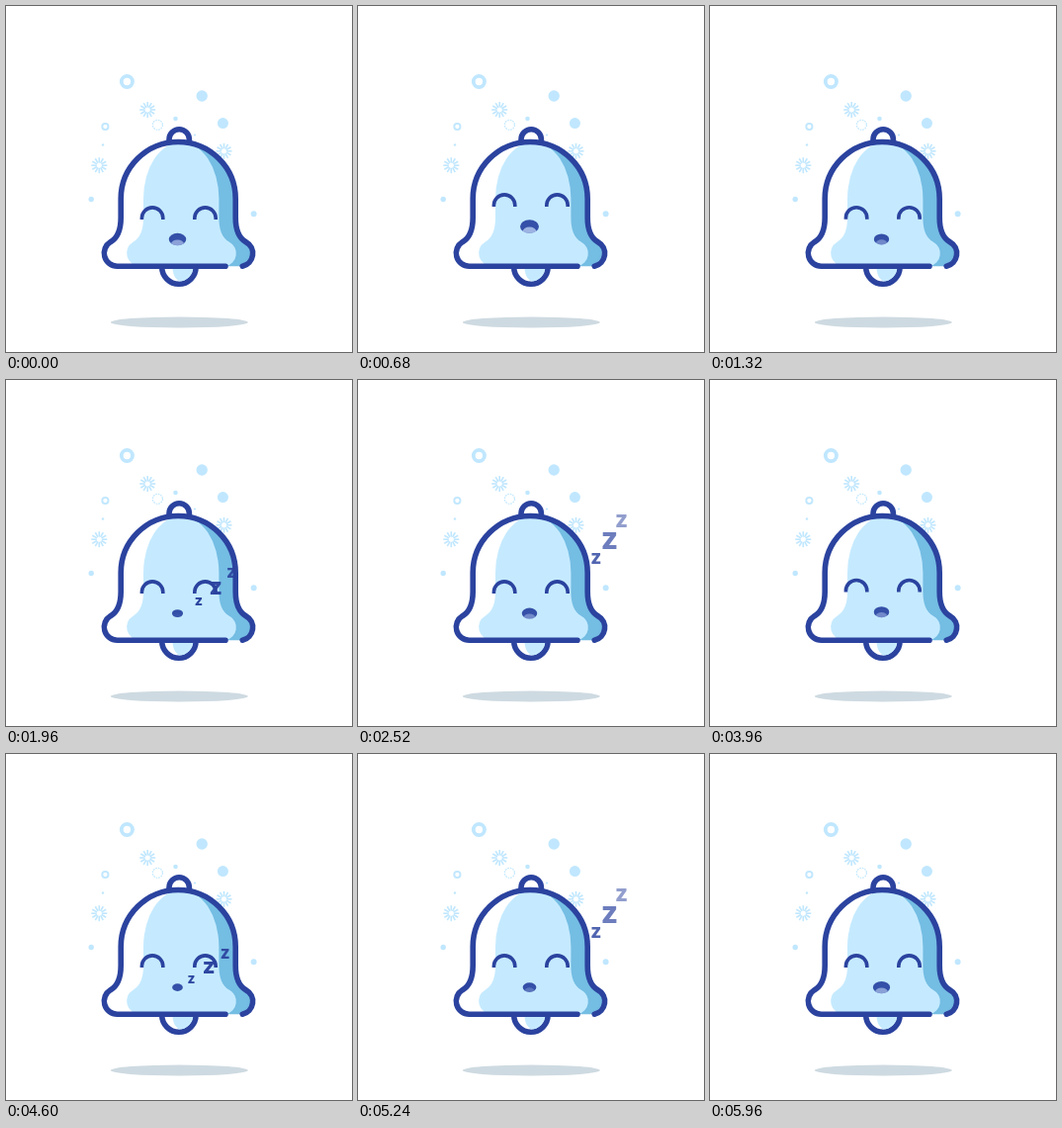
An HTML page for the animation above (6 s loop, 350 by 350 pixels).

```html
<!DOCTYPE html>
<html lang="en">
<head>
<meta charset="utf-8">
<title>Sleeping bell</title>
<style>
  html, body { margin: 0; width: 100%; height: 100%; overflow: hidden; background: #fff; }
  svg { display: block; width: 100%; height: 100%; }
  text { font-family: Inter, "Open Sans", sans-serif; font-weight: 800; text-anchor: middle; fill: #2b439f; }
</style>
</head>
<body>
<svg viewBox="0 0 350 350">
  <defs>
    <path id="bell"/>
    <clipPath id="bellClip"><use href="#bell"/></clipPath>
    <clipPath id="mouthClip"><ellipse id="mouthHole" cx="173.5"/></clipPath>
  </defs>

  <ellipse cx="175.3" cy="320" rx="69.5" ry="5.5" fill="#cedae1"/>
  <g id="bubbles" fill="#c0e7ff" stroke="#c0e7ff" stroke-width="0"></g>

  <g stroke="#2b439f" stroke-width="5.6" stroke-linecap="round" fill="#fff">
    <path d="M165 138V135A10.2 10.2 0 0 1 185.4 135V138"/>
    <path d="M157.7 264A17.2 17.2 0 0 0 192.1 264"/>
    <path d="M168.5 264C168.5 271 171 276 175 278.4A14.4 14.4 0 0 0 189.3 264" fill="#c5eaff" stroke="none"/>
    <use href="#bell" stroke="none"/>
    <g clip-path="url(#bellClip)" stroke="none">
      <path d="M177 130H260V270H177Z" fill="#74bde3"/>
      <path id="glow" fill="#c5eaff"/>
    </g>
    <use href="#bell" fill="none"/>
  </g>

  <g id="eyes" fill="none" stroke="#2b439f" stroke-width="3.6">
    <path d="M137.4 216V214.6A10.7 10.7 0 0 1 158.8 214.6V216"/>
    <path d="M190.8 216V214.6A10.7 10.7 0 0 1 212.2 214.6V216"/>
  </g>
  <g id="mouth">
    <ellipse id="lips" cx="173.5" fill="#3450a8"/>
    <g clip-path="url(#mouthClip)"><ellipse id="tongue" cx="173.5" fill="#c0d4f6"/></g>
  </g>
  <g id="snores"></g>
</svg>
<script>
const LOOP = 6000;
const $ = id => document.getElementById(id);

function set(el, attrs) {
  for (const key in attrs) el.setAttribute(key, attrs[key]);
}
function add(parent, tag, attrs = {}) {
  const el = document.createElementNS("http://www.w3.org/2000/svg", tag);
  set(el, attrs);
  return parent.appendChild(el);
}

const clamp = u => Math.max(0, Math.min(1, u));
const smooth = u => u * u * (3 - 2 * u);
const ramp = (t, from, to) => smooth(clamp((t - from) / (to - from)));

// Bell silhouette between two side walls, open at the bottom right.
function bellPath(left, right) {
  const rx = (right - left) / 2;
  return `M222 263.2H${left - 3.7}
    a13.2 13.2 0 0 1 -6.8 -24.5C${left - 3} 234.5 ${left} 226 ${left} 214V195
    A${rx} 57.5 0 0 1 ${right} 195V214C${right} 226 ${right + 3} 234.5 ${right + 10.5} 238.7
    a13.2 13.2 0 0 1 -3.5 24.5`;
}
set($("bell"), { d: bellPath(116.2, 232.2) });
set($("glow"), { d: bellPath(139, 215.4) });

const bubbles = $("bubbles");
const dot = (cx, cy, r) => add(bubbles, "circle", { cx, cy, r });
const ring = (cx, cy, r, width, dash = "none") =>
  add(bubbles, "circle", { cx, cy, r, fill: "none", "stroke-width": width, "stroke-dasharray": dash });
function burst(x, y) {
  for (let angle = 0; angle < 360; angle += 30)
    add(bubbles, "path", { d: "M0-2.6V-8", "stroke-width": 1.6, transform: `translate(${x} ${y}) rotate(${angle})` });
}

dot(198.2, 91, 5.7);
dot(219.4, 118.6, 5.5);
dot(171.5, 114, 2.3);
dot(86.2, 195.5, 2.7);
dot(250.6, 210.2, 3);
dot(98, 140.5, 1.2);
dot(191, 130.5, 1.1);
ring(122.4, 76.5, 5.6, 3.8);
ring(100.4, 122, 3.1, 1.9);
ring(153.4, 120.3, 5, 1.3, "1.6 1");
burst(143.2, 105);
burst(94.3, 161.2);
burst(220.5, 146.8);

const lift = t => t < 2600
  ? ramp(t, 0, 640) - ramp(t, 680, 1370)
  : ramp(t, 2620, 3220) - ramp(t, 3270, 4140);

// Times at which the mouth is in turn widest and smallest.
const breaths = [660, 1880, 3240, 4600, 660 + LOOP];

function openness(t) {
  if (t < breaths[0]) t += LOOP;
  const i = breaths.findIndex((end, k) => k > 0 && t <= end);
  const u = ramp(t, breaths[i - 1], breaths[i]);
  return (i % 2 ? 1 - u : u) ** 0.7;
}

const SNORE_LIFE = 1310;
const SNORE_STARTS = [1363, 4083];
const snores = [12.5, 18, 12.5].map((size, i) => {
  const el = add($("snores"), "text");
  el.textContent = "z";
  return { el, size, delay: i * 195 };
});

function drawSnore({ el, size, delay }, t) {
  const start = SNORE_STARTS[t < 3600 ? 0 : 1] + delay;
  const u = (t - start) / SNORE_LIFE;
  const visible = u > 0 && u < 1;
  set(el, { visibility: visible ? "visible" : "hidden" });
  if (!visible) return;
  const fontSize = size * (1 + 0.9 * u);
  set(el, {
    x: 175 + 130 * u - 30 * u * u,
    y: 236 - 70.5 * u - 39.5 * u * u + fontSize * 0.273,
    "font-size": fontSize,
    opacity: Math.min(u * 10, 1 - 0.66 * u ** 2.4)
  });
}

function draw(t) {
  const rise = -13 * lift(t);
  set($("eyes"), { transform: `translate(0 ${rise})` });

  const open = openness(t);
  const rx = 5.4 + 4.1 * open, ry = rx * 0.71;
  set($("mouth"), { transform: `translate(0 ${236.1 + rise})` });
  set($("lips"), { rx, ry });
  set($("mouthHole"), { rx, ry });
  set($("tongue"), { cy: ry * 0.8, rx: rx * 0.75, ry: ry * 0.75, opacity: 0.75 * open });

  snores.forEach(s => drawSnore(s, t));
}

const began = performance.now();
function tick() {
  draw((performance.now() - began) % LOOP);
  requestAnimationFrame(tick);
}
tick();
</script>
</body>
</html>
```
